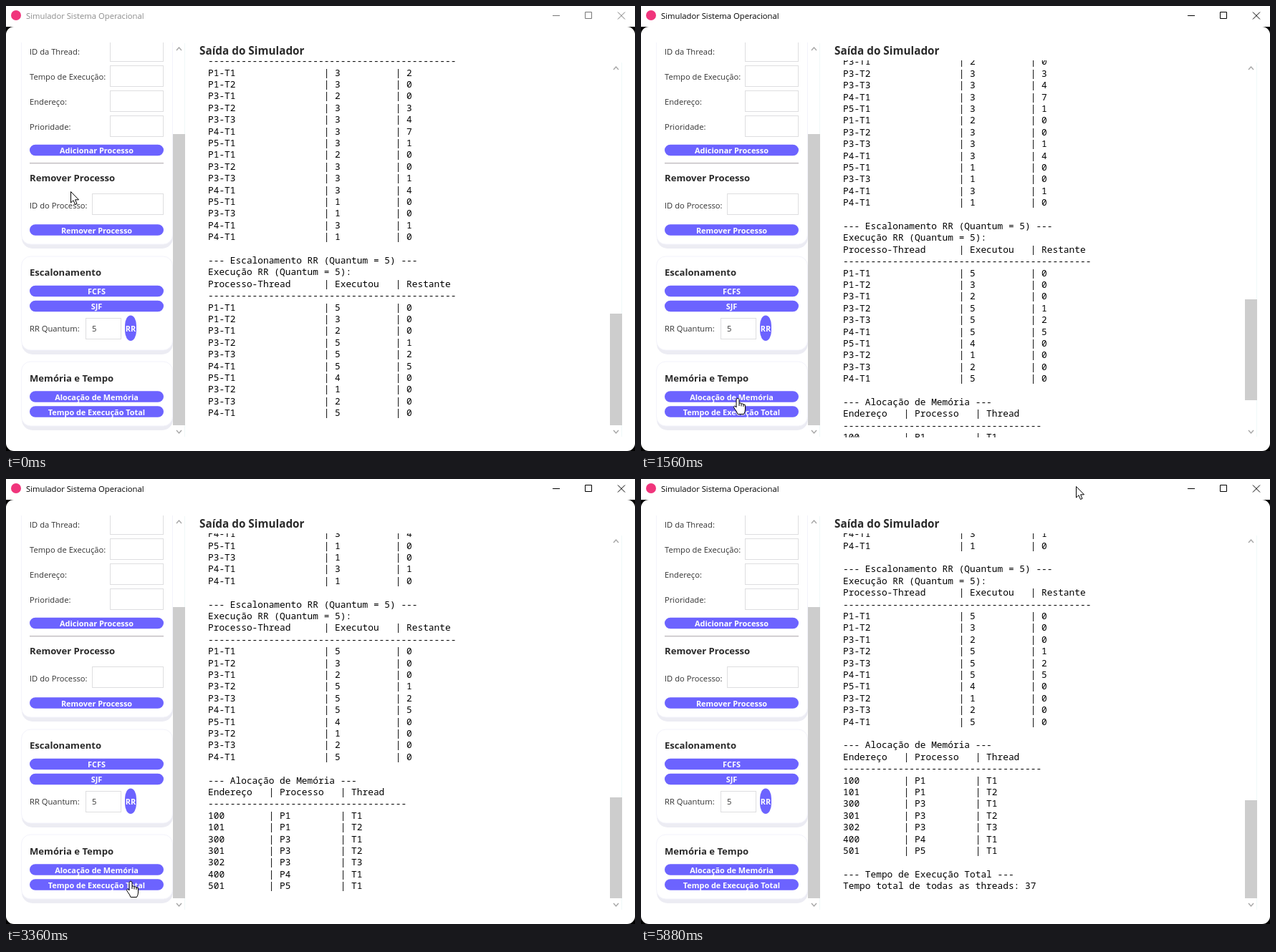
Write an HTML page that moves like this. It is 878x622 px and loops after 5.92 s.

```html
<!DOCTYPE html>
<html lang="pt">
<head>
<meta charset="utf-8">
<title>Simulador Sistema Operacional</title>
<style>
  html, body { margin: 0; width: 100%; height: 100%; overflow: hidden; background: #fff; }
  svg { display: block; width: 878px; height: 622px; }
  text { font: 11.2px "Open Sans", "Noto Sans", sans-serif; fill: #333; white-space: pre; }
  text.bold { font-weight: 700; font-size: 13.1px; fill: #2a2a2a; }
  text.title { font-size: 11.26px; }
  text.head { font-weight: 700; font-size: 15.3px; fill: #2a2a2a; }
  text.button { font-weight: 700; font-size: 10.9px; fill: #fff; text-anchor: middle; }
  text.mono { font: 12.83px "Noto Sans Mono", "DejaVu Sans Mono", monospace; fill: #000; }
</style>
</head>
<body>
<svg id="stage" viewBox="0 0 878 622" xmlns="http://www.w3.org/2000/svg"></svg>
<script>
const LOOP = 5920, STEP = 40, LINE = 16.4;
const stage = document.getElementById("stage");

function add(parent, tag, attrs = {}, content) {
  const node = document.createElementNS("http://www.w3.org/2000/svg", tag);
  for (const key in attrs) node.setAttribute(key, attrs[key]);
  if (content !== undefined) node.textContent = content;
  parent.appendChild(node);
  return node;
}
const rect = (parent, x, y, width, height, fill, more) =>
  add(parent, "rect", { x, y, width, height, fill, ...more });
const label = (parent, x, y, content, style = "") =>
  add(parent, "text", { x, y, class: style }, content);
const path = (parent, d, stroke, more) =>
  add(parent, "path", { d, stroke, fill: "none", ...more });

function clipGroup(id, x, y, width, height) {
  rect(add(stage, "clipPath", { id }), x, y, width, height);
  return add(stage, "g", { "clip-path": `url(#${id})` });
}

// Window frame
rect(stage, 0, 0, 878, 622, "#fff");
rect(stage, 0, 29, 878, 593, "#000");
rect(stage, 0, 29, 878, 593, "#fff", { rx: 11 });
add(stage, "circle", { cx: 14, cy: 13, r: 7, fill: "#f0357c" });
const title = label(stage, 28, 18, "Simulador Sistema Operacional", "title");
const controls = path(stage,
  "M763 13.5H773M808.5 8.5H817.5V17.5H808.5ZM854 8.5L864 18.5M864 8.5L854 18.5", "#777");

// Side panel
const side = clipGroup("sideClip", 18, 51, 233, 552);
const buttons = [], fields = [];

function card(y, height) {
  rect(side, 22, y + 8, 211, height - 2, "#ececf3", { rx: 15 });
  rect(side, 21.5, y, 211, height, "#fff", { rx: 13, stroke: "#f3f3fb" });
}
function button(x, y, width, height, content, baseline) {
  rect(side, x, y, width, height, "#6c63ff", { rx: 8, ry: Math.min(height / 2, 14) });
  label(side, x + width / 2, baseline, content, "button");
  buttons.push([x, y, width, height]);
}
const wideButton = (y, content) => button(33, y, 187, 15.5, content, y + 12.5);
function field(x, y, width, height = 29) {
  rect(side, x + .5, y + .5, width - 1, height, "#fff", { stroke: "#dedee0" });
  fields.push([x, y, width, height]);
}

card(20, 313);
card(350, 131);
card(497, 90);
["ID da Thread:", "Tempo de Execução:", "Endereço:", "Prioridade:"].forEach((name, i) => {
  label(side, 33, 68 + 35 * i, name);
  field(145, 48 + 35 * i, 75);
});
wideButton(193.7, "Adicionar Processo");
rect(side, 33, 219, 187, 1.3, "#bdb8bc");
label(side, 33, 245, "Remover Processo", "bold");
label(side, 33, 282.5, "ID do Processo:");
field(120, 262, 100);
wideButton(305.2, "Remover Processo");
label(side, 33, 377, "Escalonamento", "bold");
wideButton(390.7, "FCFS");
wideButton(411.7, "SJF");
label(side, 33, 455, "RR Quantum:");
field(111, 436, 50);
label(side, 120, 455, "5");
button(166, 432.5, 16, 35.5, "RR", 455);
label(side, 33, 524.5, "Memória e Tempo", "bold");
wideButton(538.3, "Alocação de Memória");
wideButton(559.3, "Tempo de Execução Total");

function scrollbar(x, top) {
  rect(stage, x, top - 8, 17, 610 - top, "#fff");
  rect(stage, x + 16, top - 8, 1, 610 - top, "#eff8f8");
  path(stage, `M${x + 5} ${top + 2}l3.5 -4l3.5 4M${x + 5} 593l3.5 4l3.5 -4`, "#a2a2a2",
    { "stroke-width": 1.2 });
  return rect(stage, x, 179, 17, 407, "#cdcdcd");
}
scrollbar(233, 60);
const thumb = scrollbar(843, 87);

// Simulator output
label(stage, 270, 68, "Saída do Simulador", "head");
const output = add(clipGroup("outputClip", 270, 76, 572, 527), "g");
const runRow = code => {
  const [process, thread, ran, left] = code;
  return `P${process}-T${thread}`.padEnd(21) + `| ${ran}`.padEnd(13) + `| ${left}`;
};
const runs = codes => codes.split(" ").map(runRow);
const memoryRow = (address, process, thread) =>
  address.padEnd(11) + `| ${process}`.padEnd(13) + `| ${thread}`;

const sections = [
  [
    "-".repeat(45),
    ...runs("1132 1230 3120 3233 3334 4137 5131 1120 3230 3331 4134 5110 3310 4131 4110"),
    "",
    "--- Escalonamento RR (Quantum = 5) ---",
    "Execução RR (Quantum = 5):",
    "Processo-Thread".padEnd(21) + "| Executou   | Restante",
    "-".repeat(45),
    ...runs("1150 1230 3120 3251 3352 4155 5140 3210 3320 4150")
  ],
  [
    "",
    "--- Alocação de Memória ---",
    memoryRow("Endereço", "Processo", "Thread"),
    "-".repeat(36),
    ..."100 101 300 301 302 400 501".split(" ").map(address => {
      const thread = address === "501" ? 1 : +address[2] + 1;
      return memoryRow(address, "P" + address[0], "T" + thread);
    })
  ],
  [
    "",
    "--- Tempo de Execução Total ---",
    "Tempo total de todas as threads: 37"
  ]
];
const rows = sections.flatMap((lines, section) => lines.map(content => ({ content, section })));
rows.forEach((row, i) => {
  row.base = 81.15 + LINE * i;
  row.node = label(output, 282, row.base, row.content, "mono");
});

// Pointer shapes share the hotspot at 0,0
const pointer = add(stage, "g");
const outline = { fill: "#fff", "stroke-linejoin": "round" };
const shapes = {
  arrow: path(pointer, "M.5 .5V16L4 12.7L6.5 18.5L9 17.4L6.6 11.8H11.5Z", "#000", outline),
  hand: path(pointer, "M-2 1.5Q0 -1.5 2 1.5V7.5Q4 5.8 5 8.2Q7 6.8 8 9Q10.5 8 10.5 11V16" +
    "Q10.5 19 8.5 22.5H0Q-1 19 -4 15.5Q-6.5 12 -4.5 11.2Q-3.2 11 -2 13Z" +
    "M2 7.5V11M5 8.2V11.5M8 9V12", "#000", outline),
  beam: path(pointer, "M-4 -7.5H-1L0 -6.5L1 -7.5H4M0 -6.5V6.5M-4 7.5H-1L0 6.5L1 7.5H4", "#000",
    { "stroke-width": 1.2 })
};

// [time, x, y]
const route = [
  [0, 90, 259], [80, 90, 259], [600, 123, 524], [880, 135, 548], [1600, 135, 548],
  [1880, 360, 420], [2400, 388, 438], [2760, 391, 440], [3040, 388, 442],
  [3400, 166, 566], [3680, 168, 566], [4000, 212, 555], [4360, 420, 440],
  [4720, 527, 374], [4880, 527, 374], [5360, 622, 60], [5880, 607, 10], [LOOP, 607, 10]
];
const clickTimes = [1000, 3480];
// Each click and wheel notch moves 48 px, up to a whole number of lines
const NOTCH = 48, memoryEnd = 11 * LINE, totalEnd = 14 * LINE;
const scrolls = [
  [0, 0], [1000, NOTCH], [2000, 2 * NOTCH], [2120, 3 * NOTCH], [2240, memoryEnd],
  [3480, memoryEnd + NOTCH], [4520, totalEnd]
];
const thumbs = [
  { height: 156, max: 0 }, { height: 141, max: memoryEnd }, { height: 137, max: totalEnd }
];

function pointerAt(t) {
  const i = Math.max(1, route.findIndex(key => key[0] > t));
  const [t0, x0, y0] = route[i - 1], [t1, x1, y1] = route[i];
  const u = (t - t0) / (t1 - t0), ease = u * u * (3 - 2 * u);
  return [x0 + (x1 - x0) * ease, y0 + (y1 - y0) * ease];
}
function shapeAt(px, py) {
  const inside = ([x, y, w, h]) => px >= x && px < x + w && py >= y && py < y + h;
  if (buttons.some(inside)) return "hand";
  return fields.some(inside) || inside([270, 78, 573, 524]) ? "beam" : "arrow";
}

function draw(t) {
  const clicks = clickTimes.filter(time => t >= time).length;
  const scroll = scrolls.filter(key => t >= key[0]).pop()[1];
  for (const { node, base, section } of rows) {
    node.setAttribute("y", Math.round(base - scroll));
    node.setAttribute("visibility", section <= clicks ? "visible" : "hidden");
  }
  const { height, max } = thumbs[clicks];
  thumb.setAttribute("height", height);
  thumb.setAttribute("y", Math.round(586 - height - (max - scroll) * .263));
  title.style.fill = clicks ? "#000" : "#8c8c8c";
  controls.setAttribute("stroke", clicks ? "#000" : "#777");

  const [x, y] = pointerAt(t).map(Math.round), shape = shapeAt(x, y);
  pointer.setAttribute("transform", `translate(${x} ${y})`);
  for (const name in shapes) shapes[name].setAttribute("display", name === shape ? "inline" : "none");
}

let start;
function tick(now) {
  start ??= now;
  draw(Math.floor(((now - start) % LOOP) / STEP) * STEP);
  requestAnimationFrame(tick);
}
draw(0);
requestAnimationFrame(tick);
</script>
</body>
</html>
```
